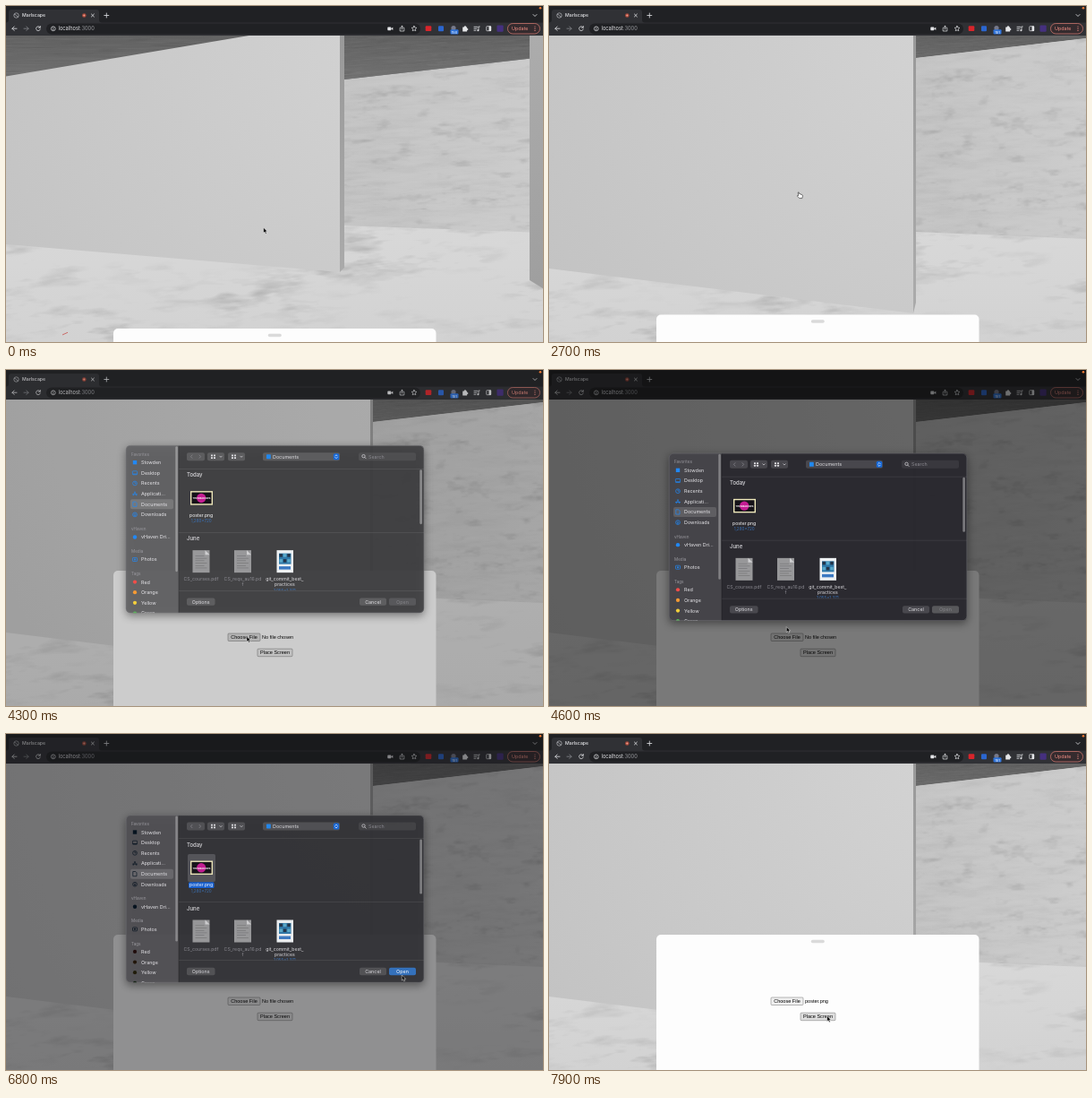
Animation, 600 px wide and 375 px high, one loop 8 s. Source, as an HTML page with a canvas:

```html
<!DOCTYPE html>
<html lang="en">
<head>
<meta charset="utf-8">
<title>Marlscape</title>
<style>
html, body { margin: 0; width: 100%; height: 100%; overflow: hidden; background: #202124; }
canvas, svg { position: absolute; left: 0; top: 0; width: 600px; height: 375px; }
text { white-space: pre; }
.ui { font-family: Inter, Roboto, sans-serif; }
.form { font: 5.56px "Liberation Sans", Arial, sans-serif; }
.off { filter: brightness(.12); }
#dialog { filter: drop-shadow(0 3px 5px rgba(0, 0, 0, .45)); }
</style>
</head>
<body>
<canvas id="room" width="600" height="375"></canvas>
<svg id="ui" viewBox="0 0 600 375"></svg>
<script>
const LOOP = 8000;
const $ = id => document.getElementById(id);
const lerp = (a, b, k) => a + (b - a) * k;
const clamp = v => Math.max(0, Math.min(1, v));
const smooth = u => u * u * (3 - 2 * u);
const ease = (t, a, b) => smooth(clamp((t - a) / (b - a)));

// ---- timing: the picture advances in steps of 100 ms, and rests between these spans
const spans = [[0, 100], [300, 300], [1200, 1200], [1400, 1400], [1600, 1600], [2000, 2300], [2700, 3000],
  [3200, 3800], [4300, 4400], [4600, 5100], [5300, 5300], [5500, 6300], [6400, 6800], [7000, 7000], [7200, 7900]];
function snap(t) {
  const [, end] = spans.filter(s => s[0] <= t).pop();
  return Math.min(end, Math.floor(t / 100) * 100);
}

// each move: start, end, x, y
const moves = [[0, 100, 288.3, 246.7], [1900, 2300, 280, 211], [3100, 3800, 269, 297.3], [4500, 5100, 219, 153],
  [5400, 5700, 400.5, 238.5], [5700, 6300, 442.3, 269], [7100, 7900, 310.7, 314.7]];
const cursorAt = t => moves.reduce(([x, y], [a, b, nx, ny]) => {
  const k = ease(t, a, b);
  return [lerp(x, nx, k), lerp(y, ny, k)];
}, [287.7, 247.3]);

// ---- room
function hash(x, y) {
  let n = Math.imul(x, 374761393) + Math.imul(y, 668265263);
  n = Math.imul(n ^ (n >>> 13), 1274126177);
  return ((n ^ (n >>> 16)) >>> 0) / 4294967296;
}
function noise(x, y) {
  const i = Math.floor(x), j = Math.floor(y), u = smooth(x - i), v = smooth(y - j);
  return lerp(lerp(hash(i, j), hash(i + 1, j), u), lerp(hash(i, j + 1), hash(i + 1, j + 1), u), v);
}
const fbm = (x, y) => noise(x, y) * .5 + noise(x * 2 + 9, y * 2) * .28 + noise(x * 4, y * 4 + 7) * .22;

function texture(w, h, shade) {
  const c = document.createElement('canvas');
  c.width = w; c.height = h;
  const g = c.getContext('2d'), img = g.createImageData(w, h);
  for (let y = 0; y < h; y++) for (let x = 0; x < w; x++) {
    const a = shade(x, y), p = (y * w + x) * 4;
    img.data.fill(a < 0 ? 255 : 50, p, p + 3);
    img.data[p + 3] = Math.abs(a) * 255;
  }
  g.putImageData(img, 0, 0);
  return c;
}
const concrete = texture(300, 220, (x, y) =>
  (fbm(x / 50, y / 5) - .5) * .14 + clamp(fbm(x / 30 + 40, y / 8) - .58) * .4);
const marble = texture(600, 130, (x, y) => {
  const smudge = clamp(fbm(x / 32 + y / 18, y / 9 - x / 140) - .44);
  return smudge * clamp(fbm(x / 100 + 2, y / 36 + 20) * 3 - 1.15) * .42;
});

const g = $('room').getContext('2d');
// a wall in view: left x, top, bottom, then right x, top, bottom
const quad = (x0, a0, b0, x1, a1, b1) => [x0, a0, x1, a1, x1, b1, x0, b0];
function path(p) {
  g.beginPath();
  for (let i = 0; i < p.length; i += 2) g.lineTo(p[i], p[i + 1]);
  g.closePath();
}
function ramp(x0, y0, x1, y1, ...stops) {
  const r = g.createLinearGradient(x0, y0, x1, y1);
  stops.forEach((c, i) => r.addColorStop(i / (stops.length - 1), c));
  return r;
}
function poly(p, fill, skin) {
  g.save();
  path(p);
  g.fillStyle = fill;
  g.fill();
  if (skin) {
    g.clip();
    const slope = (p[3] - p[1] + p[5] - p[7]) / 2;
    const top = Math.min(p[1], p[3] - slope), bottom = Math.max(p[7], p[5] - slope);
    g.transform((p[2] - p[0]) / skin.width, slope / skin.width, 0, (bottom - top) / skin.height, p[0], top);
    g.drawImage(skin, 0, 0);
  }
  g.restore();
}
function drawRoom(k) {
  const m = (a, b) => lerp(a, b, k);
  const x = m(373, 407), x2 = m(378, 410), farTop = m(82, 58), farTop2 = m(57, 36), post = m(585, 650);
  const horizon = m(245, 252);
  poly(quad(0, horizon, 375, 600, horizon, 375), ramp(0, horizon, 0, 375, '#d8d8d8', '#d2d2d2'), marble);
  const roof = ramp(0, 33, 0, 82, '#626262', '#727272');
  poly(quad(0, 20, 80, x, 20, 80), roof, concrete);
  poly(quad(x2, 20, farTop, 600, 20, farTop2), roof, concrete);
  poly(quad(x2, farTop, horizon, 600, farTop2, m(253, 260)), ramp(x2, 0, 600, 0, '#c3c3c3', '#cbcbcb'), concrete);
  const light = g.createRadialGradient(500, 0, 60, 500, 0, 620);
  light.addColorStop(0, '#d3d3d3');
  light.addColorStop(1, '#c2c2c2');
  poly(quad(0, m(78.5, -10), m(266, 293), x, m(16, -70), m(297, 343)), light);
  poly(quad(x, 0, m(297, 343), x2, 0, m(292, 331)), ramp(0, 33, 0, 300, '#999', '#aaa'));
  poly(quad(post, 0, 306, post + 55, 0, 340), ramp(0, 33, 0, 310, '#acacac', '#9f9f9f'));
  if (!k) {
    g.strokeStyle = '#c8504c'; g.lineWidth = .8;
    g.beginPath(); g.moveTo(63, 367); g.lineTo(69, 364.3); g.stroke();
  }
}

// ---- SVG helpers
const rect = (x, y, w, h, fill, r = 0, more = '') =>
  `<rect x="${x}" y="${y}" width="${w}" height="${h}" rx="${r}" fill="${fill}" ${more}/>`;
const dot = (x, y, r, fill, more = '') => `<circle cx="${x}" cy="${y}" r="${r}" fill="${fill}" ${more}/>`;
const line = (d, color, w = .8) =>
  `<path d="${d}" fill="none" stroke="${color}" stroke-width="${w}" stroke-linecap="round" stroke-linejoin="round"/>`;
const ring = (x, y, r, color) => dot(x, y, r, 'none', `stroke="${color}" stroke-width=".7"`);
const frame = (x, y, w, h, color) => rect(x, y, w, h, 'none', .6, `stroke="${color}" stroke-width=".7"`);
const text = (x, y, s, size, fill, more = '') => `<text x="${x}" y="${y}" font-size="${size}" fill="${fill}" ${more}>${s}</text>`;
const mid = 'text-anchor="middle"';
const each = (n, fn) => Array.from({ length: n }, (_, i) => fn(i)).join('');
function star(x, y, r) {
  const pts = Array.from({ length: 10 }, (_, i) => {
    const a = i * Math.PI / 5, d = i % 2 ? r * .5 : r;
    return `${(x + d * Math.sin(a)).toFixed(2)} ${(y - d * Math.cos(a)).toFixed(2)}`;
  });
  return `M${pts.join('L')}Z`;
}

function browser() {
  const w = '#e4e5e8', faint = '#85878b', salmon = '#f08d83';
  return rect(0, 0, 600, 33, '#202124')
    + `<path d="M0 18.5Q3 18.5 3 15.5V7Q3 4 6 4H101Q104 4 104 7V15.5Q104 18.5 107 18.5H600V33H0Z" fill="#303135"/>`
    + ring(11.5, 10.5, 2.7, '#b9bbbf') + line('M9.3 9.5Q12 9.5 12 11T13.5 12', '#b9bbbf', .6)
    + text(18, 12.3, 'Marlscape', 5.2, w, 'font-weight="500"')
    + dot(87.3, 10.5, 2.3, '#a5483b') + dot(87.3, 10.5, 1, '#f0a08e')
    + line('M95.4 9l3 3m0 -3l-3 3M112.3 8v5m-2.5 -2.5h5M589 9.5l2 2l2 -2', w)
    + line('M12 25.2h-5m2.2 -2.3l-2.3 2.3l2.3 2.3', w) + line('M20 25.2h5m-2.2 -2.3l2.3 2.3l-2.3 2.3', faint)
    + line('M38 23.8A2.4 2.4 0 1 0 38.3 26M38.3 22.5v1.7h-1.7', w)
    + rect(45, 19.5, 418, 12, '#202124', 6) + ring(52.8, 25.3, 2.4, w) + line('M52.8 25.2v1.3M52.8 23.9v.1', w, .7)
    + text(58.5, 27.3, `localhost<tspan fill="#96989c">:3000</tspan>`, 5.7, w)
    + rect(426.3, 23.4, 4, 3.8, w, .7) + `<path d="M430 25.3l2.3 -1.6v3.3Z" fill="${w}"/>`
    + line('M441 24.5h-.8v3.5h4.6v-3.5h-.8M442.5 26v-3.8m-1.3 1.2l1.3 -1.3l1.3 1.3', w, .7)
    + line(star(456, 25.3, 3), w, .7)
    + rect(468.7, 22.3, 6.6, 5.8, '#d8252b', 1) + rect(483, 22.3, 6, 6, '#2b66cf', 1)
    + dot(500, 24.6, 2.6, '#76798a') + rect(496.5, 26.2, 9, 5.4, '#2f73d9', 1) + text(501, 30.5, '', 4, '#fff', mid + ' id="badge"')
    + rect(510.2, 23.6, 5, 4.8, w, .5) + dot(513, 23.5, 1.2, w) + dot(515.3, 26, 1.1, w)
    + line('M523 23.3h4M523 25.3h3M523 27.3h2M528 27v-4h1.2', w) + dot(527.4, 27.2, 1, w)
    + frame(536.8, 22.7, 5, 5, w) + rect(539.5, 22.5, 2.5, 5.5, w) + rect(548.5, 21.6, 7.2, 7.2, '#45307f', 1)
    + rect(560.5, 19.5, 36, 11.5, '#352b2e', 5.7, 'stroke="#df7d73" stroke-width=".7"')
    + text(565, 27.2, 'Update', 5.4, salmon) + each(3, i => dot(591, 23 + i * 2.2, .6, salmon));
}

function sheet() {
  const button = (id, x, y, w, s) => rect(x, y, w, 8.5, '#efefef', 1, `stroke="#707070" stroke-width=".5" id="${id}"`)
    + text(x + w / 2, y + 6.2, s, 5.56, '#000', mid);
  return rect(120, 0, 360.5, 200, '#fdfdfd', 5) + rect(292.8, 5.8, 15, 3.4, '#dadada', 1.7)
    + `<g class="form">` + button('choose', 248, 70, 36, 'Choose File')
    + text(286, 76.2, '', 5.56, '#000', 'id="file"') + button('place', 281, 87.2, 39, 'Place Screen') + '</g>';
}

const blue = '#2188f5';
const clock = ring(0, 0, 2.4, blue);
const folders = [
  ['Favorites', ['Stowden', rect(-2.2, -2.2, 4.4, 4.4, blue)], ['Desktop', frame(-2.6, -2, 5.2, 4, blue) + line('M-2 1.3h4', blue)],
    ['Recents', clock + line('M0 -1.4V0H1.2', blue, .7)], ['Applicati…', line('M-1.8 2L0 -2.3L1.8 2M-2.6 .7H2.6', blue, .7)],
    ['Documents', line('M-1.8 -2.6H.8L2 -1.3V2.6H-1.8Z', blue, .7)], ['Downloads', clock + line('M0 -1.2V1.2M-1 .3l1 1l1 -1', blue, .7)]],
  ['vHaven', ['vHaven Dri…', dot(0, 0, 2.2, blue)]],
  ['Media', ['Photos', frame(-2.5, -2, 5, 4, blue) + dot(0, 0, 1, blue)]],
  ['Tags', ...Object.entries({ Red: '#f24d49', Orange: '#f69a33', Yellow: '#f5cf3b', Green: '#56c554' })
    .map(([name, c]) => [name, dot(0, 0, 2.1, c)])]
];
function sidebar() {
  let y = 10, out = rect(5, 60.2, 48, 11, '#fff', 2, 'opacity=".14"');
  for (const [title, ...rows] of folders) {
    out += text(6, y + 1.6, title, 4.6, '#98979d');
    y += 9;
    for (const [name, icon] of rows) {
      out += `<g class="icon" transform="translate(10 ${y})">${icon}</g>` + text(17, y + 2, name, 5.4, '#e6e5e9');
      y += 11.65;
    }
    y += 4.4;
  }
  return out + rect(55.3, 1, 2.6, 140, '#fff', 1.3, 'opacity=".32"');
}

function dialog() {
  const pale = '#dddce0', soft = '#8b8a91';
  const box = (x, y, w, h) => rect(x, y, w, h, '#fff', 2, 'opacity=".14"');
  const rule = y => rect(59, y, 274, .5, '#fff', 0, 'opacity=".15"');
  const button = (x, w, s) => box(x, 170.3, w, 8.4) + text(x + w / 2, 176.5, s, 5.4, pale, mid);
  const menu = x => box(x, 8, 19, 9) + each(4, i => rect(x + 4 + i % 2 * 3, 10.3 + (i >> 1) * 2.7, 2, 1.8, pale, .3))
    + line(`M${x + 13.8} 12l1.2 1.2l1.2 -1.2`, pale, .7);
  const name = (x, y, s, c) => text(x, y, s, 5.2, c, mid);
  const heading = (y, s) => text(68, y, s, 6, pale, 'font-weight="500"');
  const size = (x, y, s) => text(x, y, s, 4.6, '#3a72b8', mid);
  const doc = x => rect(x, 117, 19, 25, '#98989a') + `<path d="M${x + 14} 117v5h5Z" fill="#cfcfd1"/>`
    + each(6, i => rect(x + 3, 123 + i * 2.7, 10 + i % 2 * 3, .6, '#707072'));
  const leaflet = rect(168.5, 117, 18.5, 25, '#eef1f3') + rect(171, 120.5, 13.5, 12, '#2f78a8')
    + each(6, i => rect(171.5 + i % 3 * 4.4, 121 + (i / 3 | 0) * 6, 3.4, 3.5, i % 2 ? '#5aa9c9' : '#233348'))
    + rect(171, 135, 13, 3.5, '#3c79c2');
  const poster = rect(72, 51, 25, 15.5, '#efe9bb') + rect(73.4, 52.4, 22.2, 12.7, '#151218')
    + dot(84.2, 58.8, 5.2, '#c41c92') + text(84.5, 60.2, 'THE MEADOWS', 2.6, '#fff', mid + ' font-weight="700"');
  return `<clipPath id="frame"><rect width="333" height="187" rx="5"/></clipPath><clipPath id="list"><rect x="59" y="26" width="274" height="136"/></clipPath>`
    + `<g clip-path="url(#frame)">` + rect(59, 0, 274, 187, '#222', 0, 'id="body"') + rect(0, 0, 59, 187, '#333', 0, 'id="bar"')
    + sidebar() + rect(58.7, 0, .5, 187, '#000', 0, 'opacity=".5"')
    + box(68, 8, 20, 9) + line('M74 10.8l-1.6 1.7l1.6 1.7M82 10.8l1.6 1.7l-1.6 1.7', soft, .7) + menu(91) + menu(114)
    + box(153, 8, 86, 9) + rect(157, 10, 4.8, 5, '#2288ee', .7) + text(164, 14.5, 'Documents', 5.4, pale)
    + rect(231.8, 9, 6.4, 7, '#1668d8', 1.5) + line('M233.8 11.8l1.2 -1.2l1.2 1.2m-2.4 1.5l1.2 1.2l1.2 -1.2', '#fff', .7)
    + rect(260, 8, 64, 9, '#fff', 2, 'opacity=".07"') + ring(265.5, 12, 1.7, pale) + line('M266.8 13.3l1.4 1.4', pale, .7)
    + text(271, 14.5, 'Search', 5.3, soft)
    + rule(26) + heading(35.3, 'Today') + rule(97) + heading(106.3, 'June')
    + `<g id="picked">` + rect(69, 43.5, 31, 31, '#77777c', 2, 'opacity=".5"') + rect(70, 74.8, 28.5, 6.6, '#1761d3', 1.5) + '</g>'
    + poster + name(84.2, 79.9, 'poster.png', '#fff') + size(84.2, 86, '1,280×720')
    + `<g clip-path="url(#list)">` + doc(74.5) + doc(121) + leaflet
    + name(84, 151, 'CS_courses.pdf', soft) + name(130.5, 151, 'CS_reqs_au16.pd', soft) + name(130.5, 157.2, 'f', soft)
    + name(177.3, 151, 'git_commit_best_', pale) + name(177.3, 157.2, 'practices', pale) + size(177.3, 163.4, '1,055×1,371') + '</g>'
    + rule(162) + rect(328.3, 27, 2.6, 61, '#fff', 1.3, 'opacity=".38"') + button(68, 31.5, 'Options') + button(261, 30, 'Cancel')
    + rect(294, 170.3, 30, 8.4, '#555', 2, 'id="open"') + text(309, 176.5, 'Open', 5.4, '#fff', mid + ' id="openText"')
    + '</g>' + rect(.2, .2, 332.6, 186.6, 'none', 5, 'stroke="#77777b" stroke-width=".5"');
}

const arrow = `<path id="arrow" d="M0 0V6L1.4 4.8L2.4 7L3.5 6.5L2.5 4.4H4.3Z" fill="#000" stroke="#fff" stroke-width=".45"/>`;
const hand = `<path id="hand" d="M-1.8 -3Q-.6 -3.6 -.4 -2.2L0 -1Q1 -1.6 1.4 -.8Q2.6 -1 2.7 0Q3.7 0 3.4 1.3L2.8 3.6H-.2L-2.5 1.2Q-2.8 .2 -1.3 .5Z" fill="#fff" stroke="#222" stroke-width=".6"/>`;
$('ui').innerHTML = `<g id="panel">${sheet()}</g><g class="ui">${browser()}</g>`
  + rect(0, 0, 600, 375, '#000', 0, 'id="dim"') + dot(597, 2.2, 1.3, '#f07a35')
  + `<g id="dialog" class="ui">${dialog()}</g><g id="cursor">${arrow}${hand}</g>`;

// ---- playback
const set = (id, key, v) => $(id).setAttribute(key, v);
const show = (id, on) => set(id, 'visibility', on ? 'visible' : 'hidden');
const tone = (...c) => `rgb(${c.map(Math.round)})`;
function draw(t) {
  drawRoom(ease(t, 1000, 1600));
  set('panel', 'transform', `translate(0 ${lerp(360, 224, ease(t, 2620, 3000))})`);
  set('cursor', 'transform', `translate(${cursorAt(t)})`);
  const pointing = t >= 2300 && t < 3300;
  show('hand', pointing);
  show('arrow', !pointing);
  $('badge').textContent = t < 300 ? '150' : '151';
  $('file').textContent = t < 7000 ? 'No file chosen' : 'poster.png';
  set('choose', 'fill', t >= 3800 && t < 4600 ? '#dedede' : '#efefef');
  set('place', 'fill', t >= 7900 ? '#dedede' : '#efefef');

  // the dialog drops in dark, and turns grey while it enters or leaves
  const leaving = ease(t, 6500, 7300), away = 1 - ease(t, 4200, 4700) + leaving;
  const grey = Math.sqrt(clamp(away)), chosen = t >= 5300, open = t >= 4300 && t < 7300;
  const fadeIn = 1 - (1 - clamp((t - 4200) / 900)) ** 4;
  set('dim', 'opacity', .6 * fadeIn * (1 - ease(t, 6400, 7700)));
  set('dim', 'fill', tone(34 * grey, 34 * grey, 35 * grey));
  set('dialog', 'display', open ? 'inline' : 'none');
  set('dialog', 'transform', `translate(134 ${94 - 11 * away})`);
  set('dialog', 'opacity', 1 - leaving ** 3);
  set('body', 'fill', tone(lerp(33, 64, grey), lerp(31, 64, grey), lerp(39, 66, grey)));
  set('bar', 'fill', tone(lerp(56, 100, grey), lerp(54, 100, grey), lerp(61, 102, grey)));
  for (const id of ['body', 'bar']) set(id, 'fill-opacity', 1 - .1 * grey);
  show('picked', chosen);
  set('open', 'fill', !chosen ? '#58585b' : t < 6400 ? '#1a6fe8' : '#3270bd');
  set('openText', 'fill', chosen ? '#fff' : '#838387');
  document.querySelectorAll('.icon').forEach(e => e.classList.toggle('off', t >= 6700));
}

let last = -1;
const start = performance.now();
function tick(now) {
  const t = snap(Math.max(0, now - start) % LOOP);
  if (t !== last) draw(last = t);
  requestAnimationFrame(tick);
}
tick(start);
</script>
</body>
</html>
```
